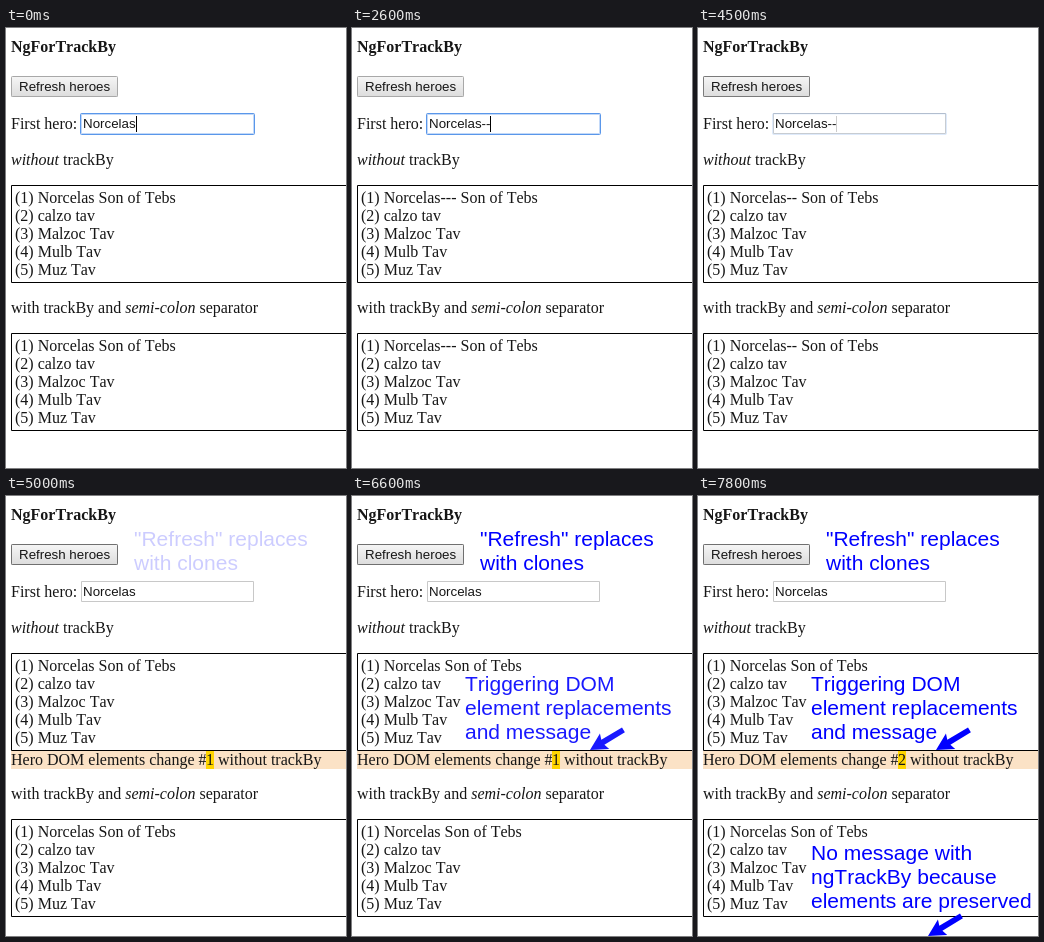
These frames come from a looping animation (340x440 px, 8 s). An HTML page with a canvas:

```html
<!DOCTYPE html>
<html lang="en">
<head>
<meta charset="utf-8">
<title>NgForTrackBy</title>
<style>
  html, body { margin: 0; width: 100%; height: 100%; overflow: hidden; background: #fff; }
  canvas { display: block; }
</style>
</head>
<body>
<canvas id="stage" width="340" height="440"></canvas>
<script>
const ctx = document.getElementById('stage').getContext('2d');
const LOOP = 8000, STEP = 100, FADE = 1000;

const SERIF = '16px "Liberation Serif", "Times New Roman", serif';
const SANS = '"Liberation Sans", Arial, sans-serif';
const CONTROL = '13.333px ' + SANS;
const NOTE = '21px ' + SANS;

const HERO = 'Norcelas';
const OTHERS = ['calzo tav', 'Malzoc Tav', 'Mulb Tav', 'Muz Tav'];

// Step schedules: [time, value]
const TYPED = [[0, 0], [900, 1], [1000, 2], [1100, 3], [1300, 4], [2600, 2], [4900, 0]];
const LISTED = [[0, 0], [1000, 1], [1100, 2], [1300, 3], [1500, 4], [2600, 3], [2800, 2], [4900, 0]];
const CARET = [[0, 1], [300, 0], [800, 1], [1800, 0], [2300, 1], [3300, 0], [3800, 1], [4700, 0]];
const COUNT = [[0, 0], [4900, 1], [6900, 2]];
const PRESSED = [[0, 0], [6700, 1], [6900, 0]];

const NOTES = [
  { start: 4900, x: 128, y: 50, lines: ['"Refresh" replaces', 'with clones'] },
  { start: 5800, x: 113, y: 195, lines: ['Triggering DOM', 'element replacements', 'and message'], tip: [238, 254] },
  { start: 6900, x: 113, y: 364, lines: ['No message with', 'ngTrackBy because', 'elements are preserved'], tip: [230, 440] }
];

function valueAt(schedule, t) {
  let value = schedule[0][1];
  for (const [time, next] of schedule) if (t >= time) value = next;
  return value;
}

// The first step is already visible at the start time
function fade(start, t) {
  return Math.max(0, Math.min(1, (t - start + STEP) / FADE));
}

function text(str, x, y, font = SERIF, color = '#161616') {
  ctx.font = font;
  ctx.fillStyle = color;
  ctx.fillText(str, x, y);
  return x + ctx.measureText(str).width;
}

function fill(color, x, y, w, h) {
  ctx.fillStyle = color;
  ctx.fillRect(x, y, w, h);
}

function outline(color, x, y, w, h, r = 0) {
  ctx.strokeStyle = color;
  ctx.lineWidth = 1;
  ctx.beginPath();
  ctx.roundRect(x + 0.5, y + 0.5, w - 1, h - 1, r);
  ctx.stroke();
}

function withAlpha(alpha, draw) {
  if (alpha <= 0) return;
  ctx.globalAlpha = alpha;
  draw();
  ctx.globalAlpha = 1;
}

function drawButton(focus, pressed) {
  const shade = ctx.createLinearGradient(0, 48, 0, 69);
  shade.addColorStop(0, pressed ? '#e0e0e0' : '#f6f6f6');
  shade.addColorStop(1, pressed ? '#ececec' : '#dcdcdc');
  fill(shade, 5, 48, 107, 21);
  outline('#a8a8a8', 5, 48, 107, 21, 1);
  withAlpha(focus, () => outline('#707070', 5, 48, 107, 21, 1));
  text('Refresh heroes', 13, 63, CONTROL);
}

function drawInput(blur, dashes, caret) {
  outline('#c8c8c8', 75, 85, 173, 21);
  withAlpha(1 - blur, () => {
    outline('#5a97ea', 74, 85, 175, 22, 1);
    outline('#c3d9f8', 75, 86, 173, 20);
  });
  const end = text(HERO + '-'.repeat(dashes), 77, 100, CONTROL);
  withAlpha(caret * (1 - blur), () => fill('#000', Math.round(end), 88, 1, 16));
}

function drawList(top, dashes) {
  outline('#000', 5, top, 400, 98);
  const rows = [HERO + '-'.repeat(dashes) + ' Son of Tebs', ...OTHERS];
  rows.forEach((row, i) => text(`(${i + 1}) ${row}`, 9, top + 18 + 18 * i));
}

function drawMessage(count) {
  fill('#fbe2c6', 5, 255, 335, 18);
  const x = Math.floor(text('Hero DOM elements change #', 5, 269));
  fill('#ffd500', x, 255, 8, 18);
  text(' without trackBy', text(String(count), x, 269), 269);
}

function drawArrow([x, y], color) {
  ctx.save();
  ctx.translate(x, y);
  ctx.rotate(Math.atan2(-21, 35));
  ctx.fillStyle = color;
  ctx.beginPath();
  ctx.moveTo(0, 0);
  for (const [px, py] of [[17, -9], [15, -3], [39, -2.8], [39, 2.8], [15, 3], [17, 9]]) ctx.lineTo(px, py);
  ctx.fill();
  ctx.restore();
}

function drawNote({ start, x, y, lines, tip }, t) {
  const alpha = fade(start, t);
  // The faintest step is a neutral grey
  const faint = alpha < 0.15;
  const ink = faint ? '#eee' : '#00f';
  withAlpha(faint && alpha > 0 ? 1 : alpha, () => {
    lines.forEach((line, i) => text(line, x, y + 24 * i, NOTE, ink));
    if (tip) drawArrow(tip, faint ? '#e4e4e4' : ink);
  });
}

function draw(t) {
  const blur = fade(3800, t);
  const count = valueAt(COUNT, t);
  const listed = valueAt(LISTED, t);
  const shift = count ? 18 : 0;

  fill('#fff', 0, 0, 340, 440);
  text('NgForTrackBy', 5, 24, 'bold ' + SERIF);
  drawButton(blur, valueAt(PRESSED, t));
  text('First hero:', 5, 101);
  drawInput(blur, valueAt(TYPED, t), valueAt(CARET, t));

  text(' trackBy', text('without', 5, 137, 'italic ' + SERIF), 137);
  drawList(157, listed);
  if (count) drawMessage(count);

  const y = 285 + shift;
  const x = text('with trackBy and ', 5, y);
  text(' separator', text('semi-colon', x, y, 'italic ' + SERIF), y);
  drawList(305 + shift, listed);

  for (const note of NOTES) drawNote(note, t);
}

ctx.fontKerning = 'none';
const begin = performance.now();
function tick() {
  const t = (performance.now() - begin) % LOOP;
  draw(Math.floor(t / STEP) * STEP);
  requestAnimationFrame(tick);
}
tick();
</script>
</body>
</html>
```
